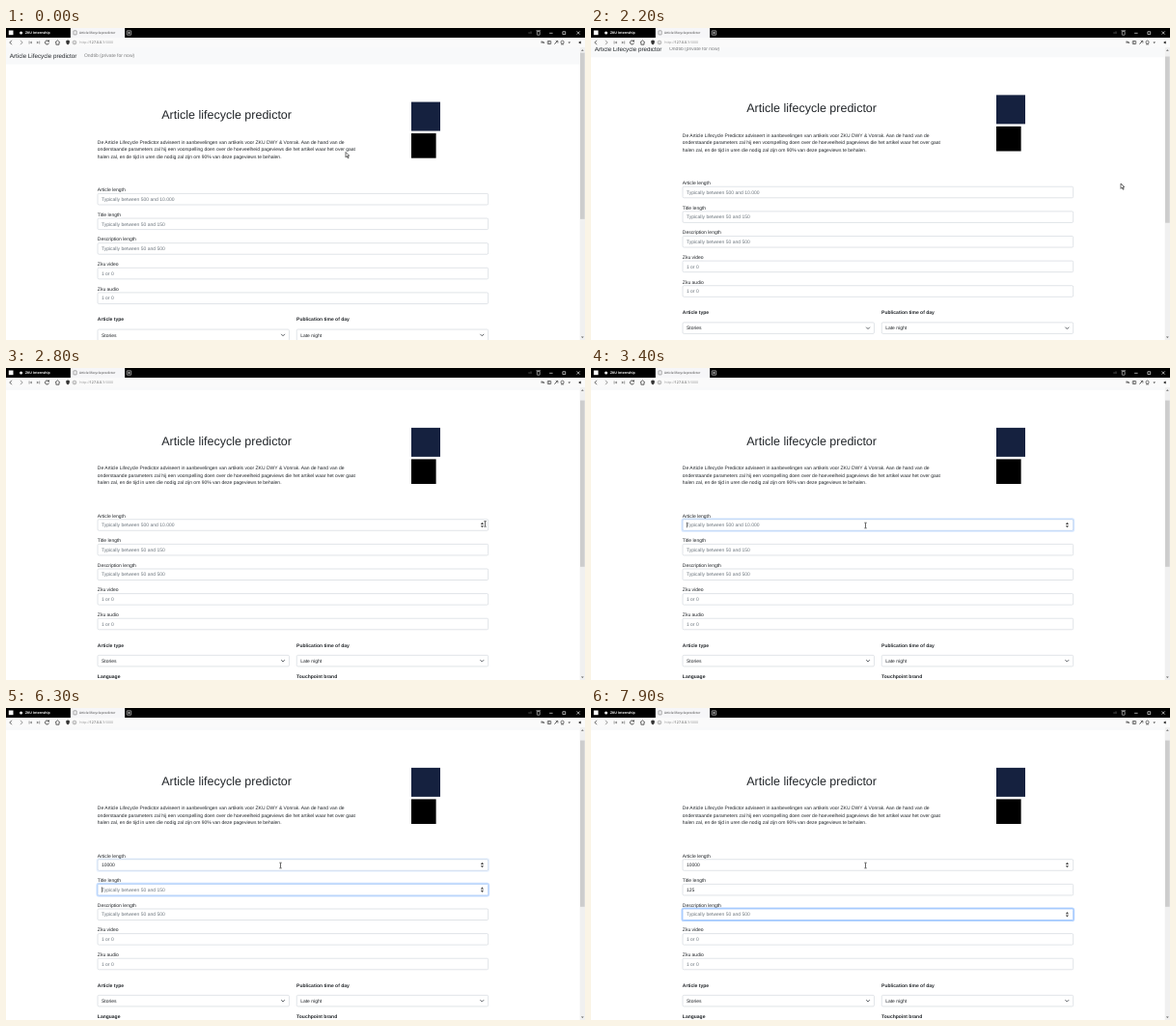
An HTML page with a canvas that plays this animation: 600 px wide and 323 px high, repeating every 8 s.

```html
<!DOCTYPE html>
<html lang="nl">
<head>
<meta charset="utf-8">
<title>Article lifecycle predictor</title>
<style>
html, body { margin: 0; width: 100%; height: 100%; overflow: hidden; background: #fff; }
canvas { display: block; width: 100vw; height: 100vh; }
</style>
</head>
<body>
<canvas id="stage"></canvas>
<script>
const W = 600, H = 323, LOOP = 8000, STEP = 100;
const K = 0.3125; // the screen is laid out 1920 units wide
const LEFT = 303.5, RIGHT = 1599.5, PAGE = 1903, TOP = 64, BOTTOM = H / K;
const BODY = '"Liberation Sans", Arial, sans-serif';
const UI = '"Open Sans", "Noto Sans", sans-serif';
const INK = '#212529', MUTED = '#6c757d';

const canvas = document.getElementById('stage');
const ctx = canvas.getContext('2d');
const dpr = window.devicePixelRatio || 1;
canvas.width = Math.round(W * dpr);
canvas.height = Math.round(H * dpr);

const fields = [
  { label: 'Article length', hint: 'Typically between 500 and 10.000', focus: 3320, blur: 6190,
    typed: [[4300, '10'], [4800, '100'], [4900, '1000'], [5100, '10000']] },
  { label: 'Title length', hint: 'Typically between 50 and 150', focus: 6190, blur: 7290,
    typed: [[6800, '1'], [7000, '12'], [7200, '125']] },
  { label: 'Description length', hint: 'Typically between 50 and 500', focus: 7290 },
  { label: 'Zku video', hint: '1 or 0' },
  { label: 'Zku audio', hint: '1 or 0' }
];
const intro = [
  'De Article Lifecycle Predictor adviseert in aanbevelingen van artikels voor ZKU DWY & Vonrak. Aan de hand van de',
  'onderstaande parameters zal hij een voorspelling doen over de hoeveelheid pageviews die het artikel waar het over gaat',
  'halen zal, en de tijd in uren die nodig zal zijn om 90% van deze pageviews te behalen.'
];
// time, x, y of the pointer in stage pixels
const hops = [
  [0, 352, 128.5], [200, 463, 135], [300, 448, 126], [800, 544, 208], [1300, 560, 218],
  [1400, 585.5, 221.5], [1500, 580, 200], [1600, 563, 175], [1700, 549, 161]
];
const caretOff = [[3900, 4300], [5600, 6190], [7900, 8000]];

const clamp = v => Math.max(0, Math.min(1, v));
const mix = (a, b, p) => a + (b - a) * p;
const smooth = p => p * p * (3 - 2 * p);
const latest = (list, t) => list.filter(e => e[0] <= t).pop();

function text(str, x, mid, size = 16, color = INK, weight = 400, family = BODY, align = 'left') {
  ctx.font = `${weight} ${size}px ${family}`;
  ctx.fillStyle = color;
  ctx.textAlign = align;
  ctx.fillText(str, x, mid + size * 0.3465);
  return ctx.measureText(str).width;
}
function rect(x, y, w, h, color) {
  ctx.fillStyle = color;
  ctx.fillRect(x, y, w, h);
}
function line(color, width, ...pts) {
  ctx.strokeStyle = color;
  ctx.lineWidth = width;
  ctx.beginPath();
  for (let i = 0; i < pts.length; i += 2) ctx.lineTo(pts[i], pts[i + 1]);
  ctx.stroke();
}
function shape(color, ...pts) {
  ctx.fillStyle = color;
  ctx.beginPath();
  for (let i = 0; i < pts.length; i += 2) ctx.lineTo(pts[i], pts[i + 1]);
  ctx.closePath();
  ctx.fill();
}
function arc(x, y, r, color, width, from = 0, to = Math.PI * 2) {
  ctx.beginPath();
  ctx.arc(x, y, r, from, to);
  if (width) {
    ctx.strokeStyle = color;
    ctx.lineWidth = width;
    ctx.stroke();
  } else {
    ctx.fillStyle = color;
    ctx.fill();
  }
}
function frame(x, y, w, h, r, color, width) {
  ctx.strokeStyle = color;
  ctx.lineWidth = width;
  ctx.beginPath();
  ctx.roundRect(x, y, w, h, r);
  ctx.stroke();
}

function scrollAt(t) {
  return Math.round(46.7 * (1 - (1 - clamp((t - 2100) / 500)) ** 3));
}
function pointerAt(t) {
  if (t <= 2600) {
    const [, x, y] = latest(hops, t);
    return { x: x / K, y: y / K };
  }
  const p = smooth(clamp((t - 2600) / 700));
  return { x: mix(549, 284.5, p) / K, y: mix(161, 163, p) / K };
}

function drawTabs() {
  rect(0, 0, 1920, 32, '#000');
  rect(9, 8, 15, 15, '#fff');
  arc(50, 16, 5, '#eee');
  text('ZKU Internship', 64, 16, 11, '#fff', 700, UI);
  rect(214, 0, 180, 32, '#f6f6f8');
  frame(224, 9, 10, 13, 1, '#777', 2);
  text('Article lifecycle predictor', 243, 16, 10.5, '#333', 400, UI);
  frame(401, 9, 14, 14, 1, '#ddd', 2);
  line('#fff', 2, 404, 16, 412, 16);
  line('#fff', 2, 408, 12, 408, 20);
  text('x8', 1732, 16, 11, '#777', 400, UI);
  frame(1761, 11, 9, 12, 1, '#ddd', 2);
  line('#ddd', 2, 1758, 9, 1773, 9);
  line('#fff', 2, 1802, 17, 1813, 17);
  frame(1846, 12, 9, 9, 0, '#fff', 2);
  line('#fff', 2, 1893, 11, 1903, 21);
  line('#fff', 2, 1903, 11, 1893, 21);
}

function drawToolbar() {
  const mid = 48, dark = '#333', soft = '#888';
  rect(0, 32, 1920, 32, '#fafafa');
  line(dark, 2.4, 19, 41, 12, mid, 19, 55);
  line('#777', 2.4, 48, 41, 55, mid, 48, 55);
  line(soft, 2.5, 77, 43, 77, 53);
  shape(soft, 86, 43, 86, 53, 79, mid);
  shape(soft, 102, 43, 102, 53, 109, mid);
  line(soft, 2.5, 111, 43, 111, 53);
  arc(136, mid, 6.5, dark, 2.6, 0.3, 5.4);
  shape(dark, 137, 44, 144, 46, 143, 39);
  line(dark, 2.4, 163, 48, 171, 41, 179, 48);
  line(dark, 2.4, 166, 47, 166, 55, 176, 55, 176, 47);
  shape(dark, 199, 42, 205, 40, 211, 42, 210, 51, 205, 56, 200, 51);
  arc(227, mid, 6, soft, 2);
  line(soft, 2, 227, 46, 227, 52);
  let x = 244;
  x += text('http://', x, mid, 11.5, '#999', 400, UI);
  x += text('127.0.0.1', x, mid, 11.5, '#444', 400, UI);
  text(':5000', x, mid, 11.5, '#999', 400, UI);

  line(dark, 2.4, 1774, mid, 1786, mid);
  line(dark, 2, 1774, 45, 1780, 45, 1784, 51);
  frame(1796, 43, 11, 10, 1, '#444', 2.4);
  line('#444', 2, 1801, 43, 1801, 53);
  line(dark, 2.6, 1819, 53, 1829, 43);
  line(dark, 2, 1823, 43, 1830, 43, 1830, 50);
  arc(1845, 47, 5, '#444', 2.4);
  line('#444', 2.4, 1840, 54, 1850, 54);
  shape(dark, 1864, 46, 1872, 46, 1868, 51);
  shape('#111', 1898, mid, 1906, 43, 1906, 53);
}

function drawSpinner(y) {
  const x = 1579;
  shape('#444', x - 5, y - 2, x + 5, y - 2, x, y - 9);
  shape('#444', x - 5, y + 2, x + 5, y + 2, x, y + 9);
}

function drawField(f, i, t, hover) {
  const y = 548 + i * 82, mid = y + 19;
  const on = f.focus ? clamp((t - f.focus) / 150) : 0;
  const off = f.blur ? clamp((t - f.blur) / 150) : 0;
  const glow = on - off;
  const active = t >= f.focus && !(t >= f.blur);
  const entry = latest(f.typed || [], t);

  text(f.label, LEFT, y - 12);
  if (glow > 0) frame(LEFT - 2, y - 2, RIGHT - LEFT + 4, 42, 6, `rgba(13,110,253,${0.3 * glow})`, 4.5);
  const edge = [[206, 134], [212, 183], [218, 254]].map(c => Math.round(mix(c[0], c[1], glow)));
  frame(LEFT + 0.5, y + 0.5, RIGHT - LEFT - 1, 37, 4, `rgb(${edge})`, 2);
  const width = text(entry ? entry[1] : f.hint, LEFT + 13, mid, 16, entry ? INK : MUTED);
  if (active && !caretOff.some(([a, b]) => t >= a && t < b)) {
    rect(LEFT + 13 + (entry ? width : 0), mid - 9, 2, 18, '#222');
  }
  if (active || hover) drawSpinner(mid);
}

function drawSelect(x, label, value) {
  text(label, x, 965, 16, INK, 700);
  frame(x + 0.5, 998.5, 635, 37, 4, '#ced4da', 2);
  text(value, x + 13, 1017);
  line('#343a40', 2.6, x + 609, 1014, x + 615, 1020, x + 621, 1014);
}

function drawPage(t, scroll, pointer) {
  ctx.save();
  ctx.beginPath();
  ctx.rect(0, TOP, PAGE, BOTTOM - TOP);
  ctx.clip();
  ctx.translate(0, -scroll);

  rect(0, TOP, PAGE, 56, '#f8f9fa');
  text('Article Lifecycle predictor', 12, 92, 20);
  text('Ondtib (private for now)', 259, 92, 16, '#7c7d7e');

  text('Article lifecycle predictor', 731.5, 288, 40, INK, 400, BODY, 'center');
  intro.forEach((s, i) => text(s, LEFT, 378 + i * 24));
  rect(1344, 245, 96, 96, '#15213f');
  rect(1344, 349, 82, 82, '#000');

  fields.forEach((f, i) => {
    const y = pointer.y + scroll - 548 - i * 82;
    const hover = pointer.x > LEFT && pointer.x < RIGHT && y > 0 && y < 38;
    drawField(f, i, t, hover);
  });
  drawSelect(LEFT, 'Article type', 'Stories');
  drawSelect(LEFT + 660, 'Publication time of day', 'Late night');
  text('Language', LEFT, 1068, 16, INK, 700);
  text('Touchpoint brand', LEFT + 660, 1068, 16, INK, 700);
  ctx.restore();
}

function drawScrollbar(scroll) {
  rect(PAGE, TOP, 17, BOTTOM - TOP, '#f0f0f0');
  rect(PAGE + 1, 82 + scroll * 0.54, 15, 551, '#cdcdcd');
  shape('#666', 1907, 76, 1916, 76, 1911.5, 71);
  shape('#666', 1907, 1022, 1916, 1022, 1911.5, 1027);
}

function drawPointer({ x, y }, scroll) {
  const row = (y + scroll - 548) % 82;
  if (x > LEFT && x < RIGHT && y + scroll > 548 && row < 38) {
    line('#222', 2.2, x, y - 8, x, y + 8);
    line('#222', 2, x - 4, y - 9, x + 4, y - 9);
    line('#222', 2, x - 4, y + 9, x + 4, y + 9);
    return;
  }
  const tip = [0, 0, 0, 17, 4, 13, 7, 20, 10, 19, 7, 12, 12, 12];
  const pts = tip.map((v, i) => v + (i % 2 ? y : x));
  shape('#fff', ...pts);
  line('#111', 2, ...pts, x, y);
}

function draw(now) {
  const t = Math.floor((now % LOOP) / STEP) * STEP;
  const scroll = scrollAt(t), pointer = pointerAt(t);
  ctx.setTransform(K * dpr, 0, 0, K * dpr, 0, 0);
  ctx.textBaseline = 'alphabetic';
  ctx.textRendering = 'geometricPrecision';
  rect(0, 0, 1920, BOTTOM + 1, '#fff');
  drawPage(t, scroll, pointer);
  drawScrollbar(scroll);
  drawTabs();
  drawToolbar();
  drawPointer(pointer, scroll);
}

const start = performance.now();
function tick() {
  draw(performance.now() - start);
  requestAnimationFrame(tick);
}
tick();
</script>
</body>
</html>
```
